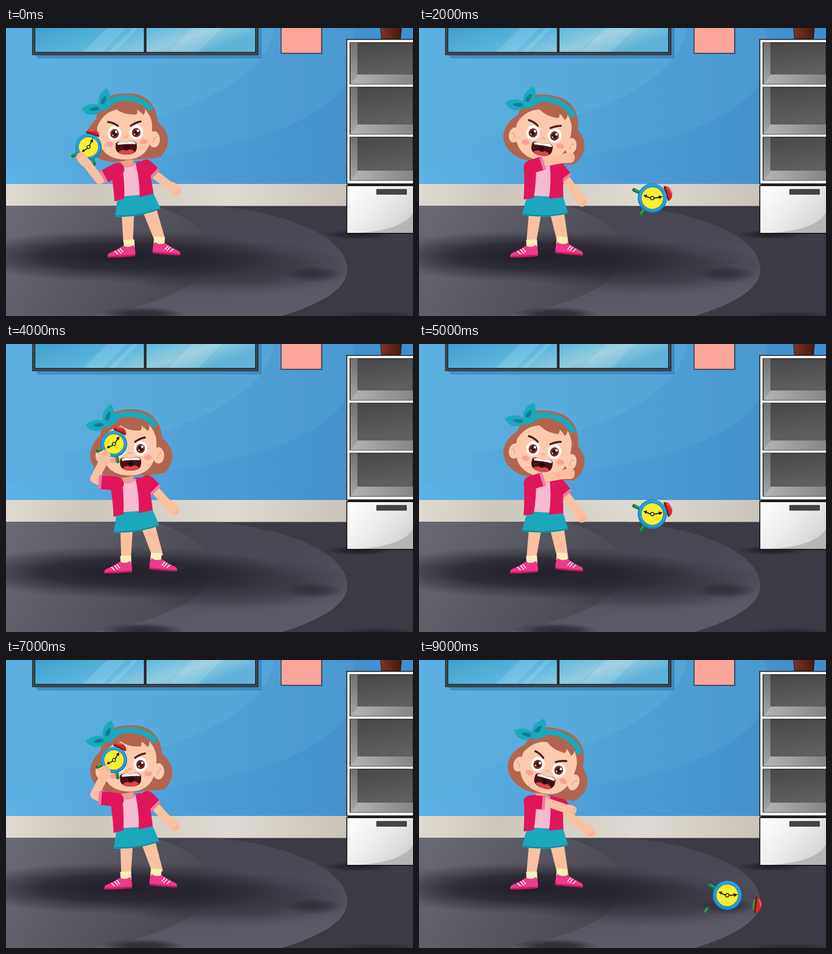
Recreate the animation shown at these times as an HTML page. Size 750x530 px, loop 10000 ms.

```html
<!DOCTYPE html>
<html lang="en">
<head>
<meta charset="utf-8">
<title>Alarm clock</title>
<style>
html, body { margin: 0; width: 100%; height: 100%; overflow: hidden; background: #3b3a45; }
svg { display: block; width: 100%; height: 100%; }
</style>
</head>
<body>
<svg viewBox="0 0 750 530" preserveAspectRatio="none">
  <defs>
    <linearGradient id="wall"><stop offset="0" stop-color="#5db3e6"/><stop offset=".5" stop-color="#4a9bd4"/><stop offset="1" stop-color="#428dca"/></linearGradient>
    <linearGradient id="glass" x2="1" y2=".3"><stop offset="0" stop-color="#3f9fcb"/><stop offset=".45" stop-color="#5bb8de"/><stop offset=".75" stop-color="#93cbdc"/><stop offset="1" stop-color="#5fb3d8"/></linearGradient>
    <linearGradient id="board"><stop offset="0" stop-color="#dfd9cf"/><stop offset=".2" stop-color="#cdc6bb"/><stop offset=".55" stop-color="#dfdad1"/><stop offset="1" stop-color="#bdb6ab"/></linearGradient>
    <linearGradient id="rugA" x2="1" y2=".35"><stop offset="0" stop-color="#696a74"/><stop offset=".5" stop-color="#595963"/><stop offset="1" stop-color="#4a4954"/></linearGradient>
    <linearGradient id="rugB" x2=".3" y2="1"><stop offset="0" stop-color="#45444f"/><stop offset=".5" stop-color="#4a4955"/><stop offset="1" stop-color="#5b5a66"/></linearGradient>
    <radialGradient id="dark"><stop offset="0" stop-color="#1f1e29"/><stop offset=".5" stop-color="#23222d" stop-opacity=".8"/><stop offset="1" stop-color="#2a2934" stop-opacity="0"/></radialGradient>
    <linearGradient id="back" x2=".2" y2="1"><stop offset="0" stop-color="#474747"/><stop offset="1" stop-color="#646464"/></linearGradient>
    <linearGradient id="side" x2="0" y2="1"><stop offset="0" stop-color="#707070"/><stop offset="1" stop-color="#a6a6a6"/></linearGradient>
    <linearGradient id="ledge"><stop offset="0" stop-color="#b4b4b4"/><stop offset="1" stop-color="#858585"/></linearGradient>
    <linearGradient id="drawer" x2="1" y2=".6"><stop offset="0" stop-color="#fff"/><stop offset=".55" stop-color="#ececec"/><stop offset="1" stop-color="#d2d2d2"/></linearGradient>
    <linearGradient id="pot"><stop offset="0" stop-color="#7d3526"/><stop offset="1" stop-color="#43190f"/></linearGradient>
  </defs>

  <path fill="url(#wall)" d="M0 0H750V288H0Z"/>
  <path fill="#5aaad8" opacity=".3" d="M0 0H640V80C590 190 390 244 0 257Z"/>
  <path fill="#5cb1dc" opacity=".4" d="M0 0H494C475 120 260 190 0 215Z"/>

  <path fill="#2f74ad" opacity=".55" d="M54 50H464V0H471V56H60Z"/>
  <path fill="#2b2c31" d="M48 0H465V50H48Z"/>
  <path fill="#4a4d53" d="M49.5 0H52V46H461V0H463V48.5H49.5Z"/>
  <path fill="url(#glass)" d="M54 0H254V44H54ZM259 0H459V44H259Z"/>
  <path fill="#fff" opacity=".13" d="M142 44L186 0H222L178 44ZM190 44L234 0H244L200 44ZM300 44L344 0H398L354 44Z"/>

  <path fill="#2f74ad" opacity=".5" d="M512 44H581V0H584V48H512Z"/>
  <path fill="#fca69b" stroke="#35303a" stroke-width="1.5" d="M507 -3H581.5V46.5H507Z"/>

  <path fill="url(#board)" d="M0 287H750V328H0Z"/>
  <path fill="#3b3a45" d="M0 327.5H750V530H0Z"/>
  <path fill="url(#rugB)" d="M0 327.5H385C510 338 629 382 629 445C629 480 580 508 508 530H0Z"/>
  <path fill="url(#rugA)" d="M0 327.5H270C330 342 381 376 381 415C381 465 290 509 160 530H0Z"/>
  <g fill="url(#dark)">
    <ellipse cx="215" cy="420" rx="300" ry="48"/>
    <ellipse cx="415" cy="440" rx="235" ry="50" opacity=".6"/>
    <ellipse cx="566" cy="453" rx="55" ry="15" opacity=".55"/>
    <ellipse cx="252" cy="527" rx="78" ry="14" opacity=".8"/>
    <ellipse cx="685" cy="530" rx="75" ry="10" opacity=".6"/>
    <ellipse cx="650" cy="380" rx="65" ry="9"/>
  </g>

  <path fill="#f4f4f4" stroke="#191919" stroke-width="1.6" d="M628 21H755V287H628Z"/>
  <g id="shelf"></g>
  <path fill="#222" d="M630 286H750V290H630Z"/>
  <path fill="url(#drawer)" stroke="#191919" stroke-width="1.8" d="M628 290H755V378H628Z"/>
  <path fill="#999" opacity=".5" d="M750 340C738 362 700 374 650 377H750Z"/>
  <path fill="#444" stroke="#222" d="M683 297H738V306H683Z"/>
  <path fill="url(#pot)" stroke="#2a0f09" d="M690 -2H729L727 20H692Z"/>

  <g id="scene"></g>
</svg>
<script>
const SKIN = '#fccaab', LIMB = '#fbc09f', SHADE = '#eda086', HAIR = '#b1654f', TEAL = '#1ba8bd',
      DEEP = '#0c7f95', VEST = '#e0165b', ROSE = '#f7bad3', SHOE = '#ee3a8c';

const shape = (d, fill, more = '') => `<path d="${d}" fill="${fill}" ${more}/>`;
const line = (d, color, w, cap = 'round') =>
  shape(d, 'none', `stroke="${color}" stroke-width="${w}" stroke-linecap="${cap}" stroke-linejoin="round"`);
const oval = (x, y, rx, ry, fill) => `<ellipse cx="${x}" cy="${y}" rx="${rx}" ry="${ry}" fill="${fill}"/>`;
const group = (move, ...parts) => `<g transform="${move}">${parts.join('')}</g>`;

document.getElementById('shelf').innerHTML = [[27, 103], [109, 195], [201, 280]].map(([a, b]) =>
  shape(`M634 ${a}H750V${b}H634Z`, 'url(#back)', 'stroke="#222" stroke-width="1.4"') +
  shape(`M635 ${a}H648V${b - 18}L635 ${b}Z`, 'url(#side)') +
  shape(`M648 ${b - 18}H750V${b}H635Z`, 'url(#ledge)') +
  line(`M648 ${a}V${b - 18}H750`, '#4a4a4a', .7)).join('');

function eye(x, y) {
  return oval(x, y, 12.5, 13.5, '#fff') + oval(x, y + .5, 8, 8.5, '#7a2f20') + oval(x, y + .5, 4.5, 5, '#35110c') +
    oval(x + 3, y - 3, 2.3, 2.5, '#fff') + oval(x - 3, y + 3.5, 1.2, 1.2, '#fff');
}

const hairBack = shape('M169 165C164 132 190 120 224 120C258 120 277 140 280 173C301 190 306 214 285 237C265 242 244 240 222 243C204 249 180 248 162 234C139 216 144 186 169 165Z', HAIR);
const bow =
  shape('M185 111C173 119 167 131 172 144L186 143C194 132 193 119 185 111Z', TEAL) +
  shape('M139 149C149 139 164 137 175 143L173 155C161 163 146 161 139 149Z', TEAL) +
  shape('M175 142L200 128L201 138L181 154Z', TEAL) +
  shape('M175 141C174 133 178 128 184 124C186 132 183 138 178 142ZM172 146C164 144 158 146 153 150C161 154 168 153 173 149Z', DEEP) +
  oval(177, 146, 6, 6.5, TEAL);
const mouth =
  shape('M202 216C201 207 214 209 222 211C231 206 242 207 241 217C242 228 235 233 222 233C208 233 201 228 202 216Z', '#481213') +
  shape('M205 212C210 208 217 210 222 211C230 207 237 208 239 212L238 214C230 213 214 214 206 215Z', '#fff') +
  shape('M207 229C212 223 218 224 222 226C227 222 234 223 237 228C232 232 228 233 222 233C216 233 211 232 207 229Z', '#dc4746') +
  shape('M217 219L222 215L227 219L225 225H219Z', '#260708');
const head = hairBack +
  oval(167, 205, 10, 14, SKIN) + oval(273, 205, 10.5, 15, SKIN) +
  line('M271 211C272 203 275 201 278 200M169 211C168 204 165 202 162 201', SHADE, 1.6) +
  shape('M168 178C165 219 183 242 220 242C256 242 271 218 269 178C268 148 248 136 220 136C187 136 168 150 168 178Z', SKIN) +
  shape('M166 186C162 145 184 125 220 125C256 125 276 148 271 188C270 172 266 161 256 149C257 154 256 157 253 160C249 156 246 153 241 150C243 154 242 157 240 159C226 160 213 157 204 150C185 154 174 166 166 186Z', HAIR) +
  line('M189 136C214 123 252 128 267 151', TEAL, 10.5, 'butt') + bow +
  line('M188 173Q198 174 206 180M230 180Q238 174 248 172', '#4a1f17', 3.6) +
  eye(200, 194) + eye(240, 192) +
  line('M218 201Q221 199 223 201', SHADE, 2) +
  oval(190, 214, 7.5, 5, '#f9a493') + oval(254, 209, 7.5, 5, '#f9a493') + mouth;

const lower =
  shape('M213 340L216 393H234L236 340Z', LIMB) +
  shape('M252 338L274 392L293 387L277 332Z', LIMB) +
  shape('M206 307L270 301L285 333Q246 349 201 348Z', TEAL) +
  line('M202 346Q246 347 284 332', DEEP, 1.4, 'butt');
const upper =
  shape('M211 236H235V258H211Z', SHADE) +
  shape('M208 250Q224 262 242 247L250 307L213 310Z', ROSE) +
  shape('M213 248L192 259Q198 288 200 319L218 314Q219 280 213 248Z', VEST) +
  shape('M238 246L262 244L272 305L246 311Q247 280 238 246Z', VEST) +
  line('M211 251Q224 261 239 249', '#ef8fb0', 2.5);

// One shoe, toe to the left; mirrored for the other foot.
const shoe = shape('M31 -10H51V5H31Z', '#fdeeb8') +
  shape('M30 0C22 6 12 9 3 13Q0 15 0 20H51Q53 9 49 0Q39 6 30 0Z', SHOE) +
  shape('M0 18H51V21Q25 22 2 21Z', '#c9185f') +
  line('M20 7L25 14M24 5L29 12M14 10L19 15', '#fff', 1.6);

// Sleeve, striped cuff and bare arm along a chain of points.
function arm(sleeve, bare, fist) {
  const [[ax, ay], [bx, by]] = sleeve;
  const k = 5 / Math.hypot(bx - ax, by - ay);
  const cuff = `M${bx - (bx - ax) * k} ${by - (by - ay) * k}L${bx} ${by}`;
  const [x, y, turn] = fist;
  return line('M' + bare.join('L'), LIMB, 16) +
    line(`M${ax} ${ay}L${ax + (bx - ax) * .5} ${ay + (by - ay) * .5}`, VEST, 24) +
    line(`M${ax} ${ay}L${bx} ${by}`, VEST, 25, 'butt') +
    line(cuff, '#f07ba8', 25, 'butt') +
    group(`translate(${x} ${y}) rotate(${turn})`,
      shape('M-12 -8C-4 -10 6 -11 11 -6C14 0 11 9 4 10L-12 8Z', LIMB),
      line('M4 -4L10 -3M5 1L11 1M4 5L9 5', SHADE, 1.2));
}

const bell = shape('M-14 4C-13 -10 13 -10 14 4Z', '#dc2430') +
  shape('M-14 2H14V5H-14Z', '#6d1d16') + line('M-9 -1Q-5 -5 1 -5', '#f06a62', 2) + shape('M-10 5H10L7 8H-7Z', '#2e9b45');
const foot = line('M0 -6L0 5', '#17783a', 6.5) + line('M-1 -5L-1 3', '#35ad50', 2.6);
const dial = oval(0, 0, 27, 27, '#1685c9') + oval(-1, -1, 25, 25, '#27a3e0') +
  oval(0, 0, 21, 21, '#176fa8') + oval(0, 0, 20, 20, '#f9ee2f') +
  line('M1 -3L3 -16M-1 3L-8 12', '#1d1d1d', 2) +
  shape('M3 -19L-1 -12L6 -12ZM-10 14L-9 7L-4 11Z', '#1d1d1d') +
  `<circle r="3.2" fill="#f9ee2f" stroke="#1d1d1d" stroke-width="1.6"/>`;

function clock(x, y, turn, size) {
  return group(`translate(${x} ${y}) rotate(${turn}) scale(${size})`,
    group('rotate(42) translate(0 32)', foot), group('rotate(-37) translate(0 32)', foot),
    group('translate(0 -31)', bell), dial);
}

const broken =
  group('translate(539 416) rotate(118)', foot) + group('translate(529 461) rotate(32) scale(.85)', foot) +
  group('translate(624 451) rotate(96) scale(1.1)', bell) + group('translate(568 433) rotate(76)', dial);

const poses = {
  hold: {
    head: [0, 0, 0], torso: [0, 0, 0], feet: 0,
    right: arm([[258, 254], [275, 270]], ['272 268', '306 294'], [311, 297, 42]),
    prop: clock(152, 219, 18, .9),
    left: arm([[206, 260], [178, 275]], ['182 275', '172 279', '147 247'], [141, 240, -125])
  },
  aim: {
    head: [8, 0, 0], torso: [0, 0, 1.5], feet: -6,
    right: arm([[260, 253], [277, 270]], ['274 268', '303 300'], [309, 304, 48]),
    prop: clock(199, 184, 25, .9),
    left: arm([[205, 257], [171, 254]], ['178 255', '163 248', '179 217'], [182, 207, -75])
  },
  fly: {
    head: [5, 2, 11], torso: [2, 2, 8], feet: -19,
    right: arm([[256, 258], [272, 278]], ['270 277', '294 311'], [299, 317, 52]),
    prop: clock(430, 313, 72, 1),
    left: arm([[205, 256], [230, 248]], ['226 248', '262 241'], [275, 239, -8])
  },
  crash: {
    head: [10, 3, 18.5], torso: [2, 2, 8], feet: -19,
    right: arm([[256, 260], [270, 278]], ['266 279', '308 311'], [314, 316, 44]),
    prop: broken,
    left: arm([[205, 261], [232, 263]], ['230 260', '266 272'], [278, 276, 12])
  }
};

function draw(p) {
  const [hx, hy, hr] = p.head, [tx, ty, tr] = p.torso;
  const tilt = `translate(${tx} ${ty}) rotate(${tr} 235 250)`;
  return group(tilt, lower) +
    group(`translate(${187 + p.feet} 399) rotate(-3 51 20)`, shoe) +
    group(`translate(${323 + p.feet} 398) rotate(5) scale(-1 1)`, shoe) +
    p.right + group(tilt, upper) +
    group(`translate(${hx} ${hy}) rotate(${hr} 221 219)`, head) +
    p.prop + p.left;
}

const order = ['hold', ...Array(3).fill(['aim', 'fly', 'crash']).flat()];
const scene = document.getElementById('scene');
let shown = '';

function tick() {
  const name = order[Math.floor(performance.now() % 10000 / 1000)];
  if (name !== shown) scene.innerHTML = draw(poses[shown = name]);
  requestAnimationFrame(tick);
}
tick();
</script>
</body>
</html>
```
